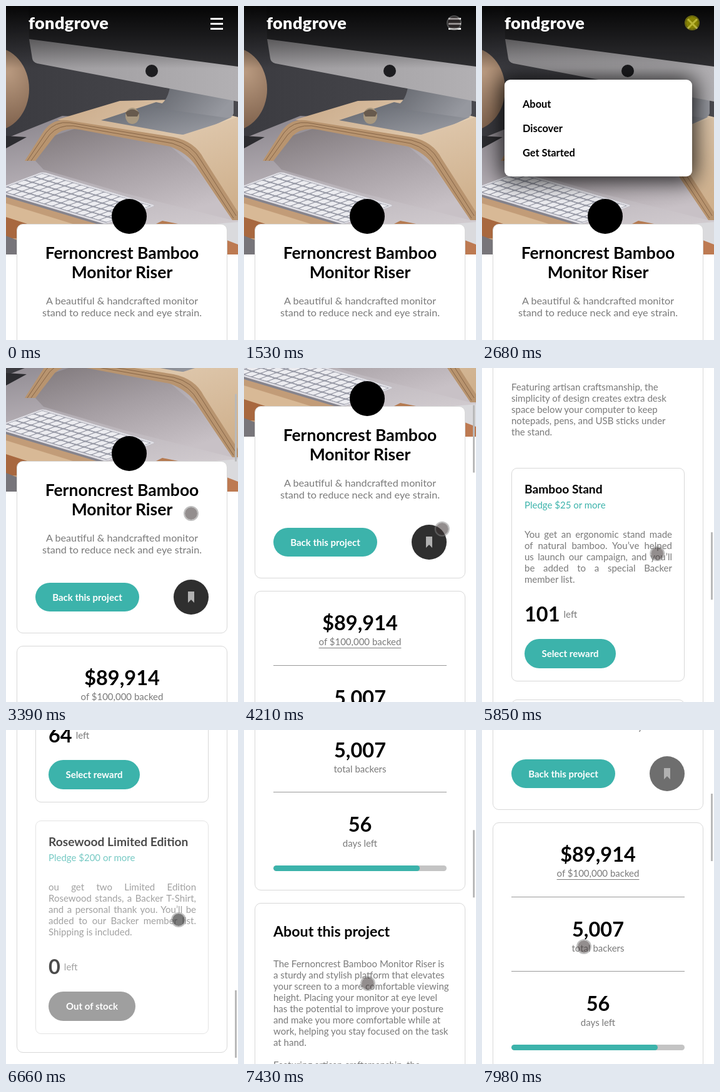
Write an HTML page that moves like this. It is 371x535 px and loops after 8000 ms.

```html
<!DOCTYPE html>
<html lang="en">
<head>
<meta charset="utf-8">
<title>Crowdfunding page</title>
<style>
@property --s { syntax: "<number>"; inherits: true; initial-value: 0; }
* { box-sizing: border-box; margin: 0; }
html, body { width: 100%; height: 100%; overflow: hidden; background: #fff; }
body { font: 15px/18px Lato, "Open Sans", sans-serif; color: #7a7a7a; }
.stage { position: absolute; inset: 0; overflow: hidden; animation: scroll 8s infinite; }
.page { position: absolute; left: 0; top: 0; width: 371px; height: 2650px; transform: translateY(calc(var(--s) * -1px)); }
.page > *, .card > *, .reward > * { position: absolute; }
.hero { left: 0; top: 0; }
b, h1, h2, h3, .btn { font-weight: 700; }
h1, h2, h3, b { color: #000; }
.brand { left: 36px; top: 11px; font: 900 27px/32px Lato, sans-serif; letter-spacing: .4px; color: #fff; }
.icon { left: 326px; top: 17px; }
.bars { animation: bars 8s infinite step-end; }
.cross { animation: cross 8s infinite step-end; }
.menu { left: 36px; top: 118px; width: 300px; height: 155px; border-radius: 9px; background: #fff; padding: 19px 29px; box-shadow: 0 2px 34px 6px #000c; font: 700 16.4px/39px Lato, sans-serif; color: #000; animation: menu 8s infinite; }
.card { left: 17px; width: 337px; border: 1px solid #d8d8d8; border-radius: 10px; background: #fff; }
.mark { left: 169px; top: 309px; width: 56px; height: 56px; border-radius: 50%; background: #000; }
.mid { left: 0; right: 0; text-align: center; white-space: nowrap; }
h1 { top: 30px; font-size: 26.5px; line-height: 31px; }
.sub { top: 112px; font-size: 16.2px; line-height: 19px; }
.btn { left: 20px; height: 47px; border-radius: 24px; background: #3cb3ab; color: #fff; text-align: center; line-height: 46px; white-space: nowrap; }
.save { left: 250px; top: 189px; width: 56px; height: 56px; border-radius: 50%; animation: save 8s infinite; }
.save svg { position: absolute; left: 23px; top: 19px; }
.num { font-size: 32.5px; line-height: 40px; }
.line { left: 29px; width: 277px; height: 1px; background: #999; }
.link { text-decoration: underline; text-underline-offset: 4px; text-decoration-thickness: 1px; text-decoration-skip-ink: none; }
.bar { left: 29px; top: 355px; width: 277px; height: 9px; border-radius: 5px; background: #c4c4c4; overflow: hidden; }
.bar i { display: block; width: 234px; height: 9px; border-radius: 5px; background: #3cb3ab; }
h2 { left: 29px; top: 30px; font-size: 23.2px; line-height: 28px; white-space: nowrap; }
.text { left: 29px; white-space: pre; }
.reward { left: 29px; width: 277px; height: 342px; border: 1px solid #d8d8d8; border-radius: 9px; }
h3 { left: 20px; top: 21px; font-size: 19.2px; line-height: 24px; white-space: nowrap; }
.pledge { left: 20px; top: 49px; color: #3cb3ab; }
.perk { left: 20px; top: 96px; width: 236px; }
.perk span { display: block; text-align: justify; text-align-last: justify; white-space: nowrap; }
.perk span:last-child { text-align-last: left; }
.left { left: 20px; top: 213px; display: flex; align-items: center; gap: 6px; }
.reward .btn { top: 273px; }
.out { opacity: .7; }
.out .btn { background: #777; }
.thumb { position: absolute; left: 366px; top: 1px; width: 3px; height: 108px; background: #b9b9b9; transform: translateY(calc(var(--s) * .2032px)); animation: thumb 8s infinite step-end; }
.cursor { position: absolute; left: -12px; top: -12px; width: 24px; height: 24px; border-radius: 50%; border: 2px solid; background-clip: padding-box; animation: move 8s infinite, press 8s infinite step-end; }

@keyframes scroll {
  0% { --s: 0; animation-timing-function: step-end; }
  34.375% { --s: 0; animation-timing-function: steps(9); }
  42.375% { --s: 200; animation-timing-function: step-end; }
  44.875% { --s: 200; animation-timing-function: steps(10); }
  54.375% { --s: 310; animation-timing-function: step-end; }
  57.875% { --s: 310; animation-timing-function: steps(8); }
  65.375% { --s: 510; animation-timing-function: steps(2); }
  67.125% { --s: 540; animation-timing-function: step-end; }
  68.75% { --s: 540; animation-timing-function: steps(6); }
  74% { --s: 1440; animation-timing-function: steps(5); }
  78.25% { --s: 2020; animation-timing-function: steps(2); }
  80% { --s: 2047; animation-timing-function: step-end; }
  83.25% { --s: 2047; animation-timing-function: steps(11); }
  92.875% { --s: 784; animation-timing-function: steps(8); }
  99.75%, 100% { --s: 497; }
}
@keyframes move {
  0% { transform: translate(400px, 102px); animation-timing-function: step-end; }
  9.875% { transform: translate(371px, 102px); animation-timing-function: steps(10); }
  19.125% { transform: translate(336px, 27px); animation-timing-function: step-end; }
  34.375% { transform: translate(336px, 27px); animation-timing-function: steps(9); }
  42.375% { transform: translate(296px, 233px); animation-timing-function: step-end; }
  44.875% { transform: translate(296px, 233px); animation-timing-function: steps(10); }
  54.375% { transform: translate(322px, 264px); animation-timing-function: steps(2); }
  56.125% { transform: translate(306px, 280px); animation-timing-function: step-end; }
  57.875% { transform: translate(306px, 280px); animation-timing-function: steps(8); }
  65.375% { transform: translate(285px, 291px); animation-timing-function: steps(2); }
  67.125% { transform: translate(283px, 293px); animation-timing-function: step-end; }
  68.75% { transform: translate(283px, 293px); animation-timing-function: steps(13); }
  80% { transform: translate(276px, 304px); animation-timing-function: step-end; }
  83.25% { transform: translate(276px, 304px); animation-timing-function: steps(11); }
  92.875% { transform: translate(198px, 406px); animation-timing-function: steps(8); }
  99.75%, 100% { transform: translate(163px, 347px); }
}
@keyframes press {
  0%, 21.75%, 34.375%, 84.25%, 100% { background-color: #40383890; border-color: #8888; }
  20%, 33.5% { background-color: #a8a200c8; border-color: #8f8a10c0; }
  83.25% { background-color: #2c2c2ca0; border-color: #8888; }
}
@keyframes menu {
  0%, 19.9% { opacity: 0; }
  20% { opacity: .15; animation-timing-function: steps(5); }
  24.375%, 34.375% { opacity: 1; }
  37%, 100% { opacity: 0; }
}
@keyframes bars { 0%, 34.375%, 100% { opacity: 1; } 20% { opacity: 0; } }
@keyframes cross { 0%, 34.375%, 100% { opacity: 0; } 20% { opacity: 1; } }
@keyframes thumb { 0% { opacity: 0; } 34.375%, 100% { opacity: 1; } }
@keyframes save { 0%, 58% { background: #2f2f2f; } 61%, 100% { background: #6e6e6e; } }
</style>
</head>
<body>
<div class="stage">
  <div class="page">
    <svg class="hero" width="371" height="398" viewBox="0 0 371 398">
      <defs>
        <linearGradient id="shade" x2="0" y2="1"><stop stop-color="#000" stop-opacity=".9"/><stop offset="1" stop-color="#000" stop-opacity="0"/></linearGradient>
        <linearGradient id="wall" x2="1" y2="0"><stop stop-color="#3b3b40"/><stop offset="1" stop-color="#4a4a4f"/></linearGradient>
        <linearGradient id="desk" x2=".3" y2="1"><stop stop-color="#88838a"/><stop offset=".5" stop-color="#b5afb5"/><stop offset="1" stop-color="#d2ccd0"/></linearGradient>
        <linearGradient id="under" x2=".6" y2="1"><stop stop-color="#7f787b"/><stop offset=".5" stop-color="#a59ea3"/><stop offset="1" stop-color="#c8c1c6"/></linearGradient>
        <linearGradient id="chin" x2="1" y2="0"><stop stop-color="#9c9a9d"/><stop offset="1" stop-color="#b2b0b3"/></linearGradient>
        <linearGradient id="foot" x2="1" y2="1"><stop stop-color="#5f636b"/><stop offset="1" stop-color="#9fa1a8"/></linearGradient>
        <linearGradient id="neck" x2="1" y2=".4"><stop stop-color="#63666d"/><stop offset="1" stop-color="#96989f"/></linearGradient>
        <linearGradient id="wood" x2="1" y2=".3"><stop stop-color="#c9a988"/><stop offset="1" stop-color="#e2cdb2"/></linearGradient>
        <linearGradient id="leg" x2=".2" y2="1"><stop stop-color="#e0cab0"/><stop offset="1" stop-color="#cfb08c"/></linearGradient>
        <radialGradient id="ball" cx=".7" cy=".3" r=".7"><stop stop-color="#b99a80"/><stop offset="1" stop-color="#7d604b"/></radialGradient>
        <pattern id="keys" width="10" height="10" patternUnits="userSpaceOnUse"><rect width="10" height="10" fill="#9a9ca8"/><rect x=".8" y=".8" width="8.4" height="8" rx="1.4" fill="#ececf0"/></pattern>
      </defs>
      <rect width="371" height="398" fill="url(#wall)"/>
      <path d="M0 212 90 176 371 190V398H0z" fill="url(#desk)"/>
      <path d="M0 208 33 210 0 228z" fill="#2c2c30"/>
      <ellipse cx="-20" cy="133" rx="57" ry="67" fill="url(#ball)"/>
      <path d="M36 0H371V98L37 53z" fill="#303033"/>
      <path d="M47 248 76 208 112 196 262 224 306 262 362 343 190 300 60 262z" fill="url(#under)"/>
      <path d="M82 182 182 152 262 150 371 178V214L282 220z" fill="url(#wood)"/>
      <path d="M152 183 240 154 361 178 304 204Q292 208 274 205z" fill="url(#foot)"/>
      <path d="M262 130 364 148V172Q362 180 352 179L238 163Q258 156 262 130z" fill="url(#neck)"/>
      <path d="M37 53 371 97V153L50 92Q43 90 42 84z" fill="url(#chin)"/>
      <circle cx="233" cy="104" r="10" fill="#1d1d20"/>
      <path d="M268 211 371 178V343H364L316 256Q304 230 268 211z" fill="url(#leg)"/>
      <path d="M30 248 60 201Q74 180 98 183L268 210Q302 217 316 244L371 330V343H362L306 260Q292 236 262 225L118 198Q92 194 78 208L47 248z" fill="#b8946f"/>
      <path d="M34 248 64 203Q78 184 102 187L268 215Q298 222 312 248L368 336M40 248 70 206Q84 190 108 192L266 220Q294 228 308 254L364 340" fill="none" stroke="#866547" stroke-width="1"/>
      <ellipse cx="202" cy="176" rx="11" ry="13" fill="#a8987f"/>
      <path d="M191 171Q202 160 213 171L210 177H194z" fill="#675a4d"/>
      <path d="M0 306 60 322 180 354V398H0z" fill="#c29c78"/>
      <path d="M0 316 110 350H0z" fill="#d8b996"/>
      <path d="M0 338 34 349V372H0z" fill="#a8683f"/>
      <path d="M0 368 20 376V398H0z" fill="#77757a"/>
      <g transform="matrix(1.243 .371 -1.44 .54 58 268)">
        <rect x="-3" y="-3" width="146" height="60" rx="4" fill="#85838c"/>
        <rect x="-3" y="-3" width="146" height="56" rx="4" fill="#dedde3"/>
        <rect width="140" height="50" fill="url(#keys)"/>
      </g>
      <path d="M232 353 250 344 290 352V398H232z" fill="#b57a50"/>
      <path d="M300 352 371 346V384L340 372z" fill="#dadadd"/>
      <path d="M340 370 371 382V398H340z" fill="#bd7a52"/>
      <rect width="371" height="100" fill="url(#shade)"/>
    </svg>
    <div class="brand">fondgrove</div>
    <svg class="icon bars" width="22" height="22"><path d="M1 3.5H21M1 11.5H21M1 19.5H21" stroke="#fff" stroke-width="3"/></svg>
    <svg class="icon cross" width="22" height="22"><path d="M3 4 18 19M18 4 3 19" stroke="#fff" stroke-width="3"/></svg>

    <section class="card" style="top:349px;height:276px">
      <h1 class="mid">Fernoncrest Bamboo<br>Monitor Riser</h1>
      <p class="mid sub">A beautiful &amp; handcrafted monitor<br>stand to reduce neck and eye strain.</p>
      <div class="btn" style="left:29px;top:194px;width:166px;height:46px">Back this project</div>
      <div class="save"><svg width="10" height="18"><path d="M0 0H10V18L5 13 0 18z" fill="#b1b1b1"/></svg></div>
    </section>
    <div class="mark"></div>

    <section class="card" style="top:645px;height:396px">
      <b class="mid num" style="top:30px">$89,914</b>
      <p class="mid" style="top:71px"><span class="link">of $100,000 backed</span></p>
      <div class="line" style="top:118px"></div>
      <b class="mid num" style="top:150px">5,007</b>
      <p class="mid" style="top:191px">total backers</p>
      <div class="line" style="top:237px"></div>
      <b class="mid num" style="top:269px">56</b>
      <p class="mid" style="top:310px">days left</p>
      <div class="bar"><i></i></div>
    </section>

    <section class="card" id="about" style="top:1061px;height:1503px">
      <h2>About this project</h2>
      <p class="text" style="top:87px">The Fernoncrest Bamboo Monitor Riser is
a sturdy and stylish platform that elevates
your screen to a more comfortable viewing
height. Placing your monitor at eye level
has the potential to improve your posture
and make you more comfortable while at
work, helping you stay focused on the task
at hand.</p>
      <p class="text" style="top:249px">Featuring artisan craftsmanship, the
simplicity of design creates extra desk
space below your computer to keep
notepads, pens, and USB sticks under
the stand.</p>
    </section>
    <nav class="menu">About<br>Discover<br>Get Started</nav>
  </div>
  <div class="thumb"></div>
  <div class="cursor"></div>
</div>
<script>
const about = document.getElementById("about");

function addReward(top, title, price, lines, left) {
  const perk = lines.map(l => `<span>${l}</span>`).join("");
  const [label, width] = left ? ["Select reward", 146] : ["Out of stock", 139];
  about.insertAdjacentHTML("beforeend", `
    <div class="reward ${left ? "" : "out"}" style="top:${top}px">
      <h3>${title}</h3>
      <p class="pledge">Pledge $${price} or more</p>
      <p class="perk">${perk}</p>
      <p class="left"><b class="num">${left}</b>left</p>
      <div class="btn" style="width:${width}px">${label}</div>
    </div>`);
}

addReward(388, "Bamboo Stand", 25, [
  "You get an ergonomic stand made", "of natural bamboo. You’ve helped",
  "us launch our campaign, and you’ll", "be added to a special Backer", "member list."], 101);
addReward(759, "Black Stand", 75, [
  "You get a black special edition", "computer stand and a personal",
  "thank you. You’ll be added to our", "Backer member list. Shipping", "is included."], 64);
addReward(1130, "Rosewood Limited Edition", 200, [
  "ou get two Limited Edition", "Rosewood stands, a Backer T-Shirt,",
  "and a personal thank you. You’ll be", "added to our Backer member list.", "Shipping is included."], 0);
</script>
</body>
</html>
```
